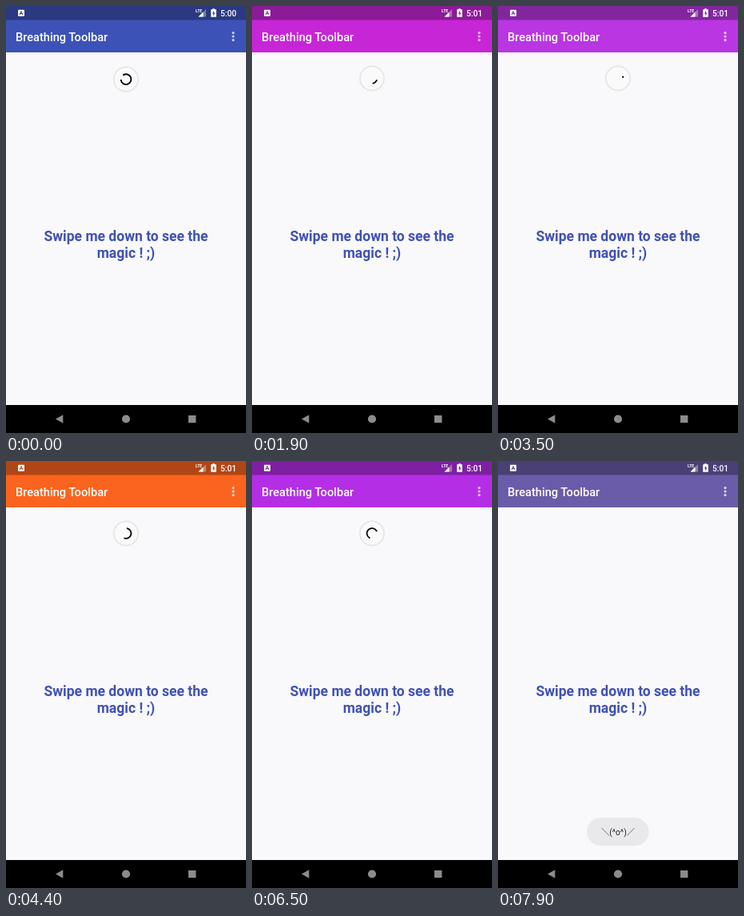
Animation of 300x534 px, one loop 8000 ms. Source, as an HTML page:

```html
<!DOCTYPE html>
<html lang="en">
<head>
<meta charset="utf-8">
<title>Breathing Toolbar</title>
<style>
html, body { margin: 0; width: 100%; height: 100%; overflow: hidden; background: #f9f8fb; }
svg { display: block; width: 300px; height: 534px; font-family: Roboto, "Noto Sans CJK JP", "Noto Sans CJK", sans-serif; }
#spinner circle { filter: drop-shadow(0 .7px 1px rgba(0, 0, 0, .3)); }
</style>
</head>
<body>
<svg viewBox="0 0 300 534">
  <rect width="300" height="534" fill="#f9f8fb"/>
  <rect id="toolbar" y="17" width="300" height="41"/>
  <rect id="status" width="300" height="17.5"/>

  <g fill="#fff">
    <rect x="15" y="4.8" width="8" height="8" rx=".8"/>
    <path id="badge" d="M17 11 19 6.6 21 11M17.8 9.6h2.4" fill="none"/>
    <text x="237" y="8.3" font-size="5" font-weight="700" textLength="">LTE</text>
    <path d="M250 4v9.5h-9.5z" opacity=".35"/>
    <path d="M246.5 7.5v6h-6z"/>
    <path d="M258.2 4.3v-1h2.6v1h2v9.4h-6.6V4.3z"/>
    <path id="bolt" d="M260 5.8 257.9 9.6h1.4v2.8l2.1-3.9h-1.4z"/>
    <text id="clock" x="268" y="13" font-size="10.2" font-weight="500">5:00</text>
    <text x="12" y="43.7" font-size="14.6" font-weight="500">Breathing Toolbar</text>
    <g opacity=".75">
      <circle cx="284" cy="33.6" r="1.6"/><circle cx="284" cy="38" r="1.6"/><circle cx="284" cy="42.6" r="1.6"/>
    </g>
  </g>

  <g fill="#3f51b5" font-size="17.5" font-weight="700" text-anchor="middle">
    <text x="150" y="294">Swipe me down to see the</text>
    <text x="150" y="314.5">magic ! ;)</text>
  </g>

  <g id="spinner">
    <circle r="14.6" fill="#fafafa"/>
    <path id="arc" fill="none" stroke="#000" stroke-width="1.83" stroke-linecap="square"/>
  </g>

  <g id="toast">
    <rect x="111" y="446" width="77.5" height="35.3" rx="17.6" fill="#e9e9eb"/>
    <text x="150" y="467.5" font-size="10.2" text-anchor="middle" fill="#222">＼(^o^)／</text>
  </g>

  <rect y="499" width="300" height="35"/>
  <g fill="#8c8c8c">
    <path d="M62 516.5 71.3 511.3v10.4z"/>
    <circle cx="150" cy="516.5" r="5.1"/>
    <rect x="228" y="512" width="9.4" height="9.2"/>
  </g>
</svg>
<script>
const LOOP = 8000, SETTLE = 200, SPIN = 866, CYCLE = 1332, HIDE = 7150, TOAST = 7400;
const colors = [
  [0, 60, 82, 183], [1000, 232, 34, 39], [1900, 199, 38, 214], [3500, 185, 54, 226],
  [4400, 251, 100, 31], [5400, 180, 46, 230], [6500, 180, 46, 230], [7900, 106, 92, 168], [8000, 100, 91, 169]
];
const el = id => document.getElementById(id);
const clamp = x => Math.max(0, Math.min(1, x));
const mix = (a, b, u) => a + (b - a) * u;

function colorAt(t) {
  const i = colors.findIndex(c => c[0] > t);
  const a = colors[i - 1], b = colors[i], u = (t - a[0]) / (b[0] - a[0]);
  return [1, 2, 3].map(k => mix(a[k], b[k], u));
}

// cubic-bezier(.4, 0, .2, 1)
function ease(x) {
  let lo = 0, hi = 1, s;
  for (let i = 0; i < 24; i++) {
    s = (lo + hi) / 2;
    if (1.2 * s * (1 - s) ** 2 + .6 * s * s * (1 - s) + s ** 3 < x) lo = s; else hi = s;
  }
  return 3 * s * s - 2 * s ** 3;
}

// Start and end of the arc, in turns
function arcAt(t) {
  if (t < SPIN) {
    const u = clamp((t - SETTLE) / (SPIN - SETTLE)), turn = mix(.67, 1, u);
    return [turn + .79 * u, turn + .8];
  }
  const total = (t - SPIN) / CYCLE, k = Math.floor(total), p = total - k;
  const base = .79 - .01 * k + .6 * total + .21 * p;
  if (p < .5) return [base, base + .79 * ease(2 * p) + .01];
  return [base + .79 * ease(2 * p - 1) - .01, base + .79];
}

function arcPath([a, b]) {
  const r = 6.4, point = v => [Math.cos(v * 2 * Math.PI) * r, Math.sin(v * 2 * Math.PI) * r].map(n => n.toFixed(3));
  return `M${point(a)}A${r} ${r} 0 ${b - a > .5 ? 1 : 0} 1 ${point(b)}`;
}

function draw(now) {
  const t = now % LOOP, rgb = colorAt(t);
  const dark = `rgb(${rgb.map(c => c * .7)})`;
  el('toolbar').setAttribute('fill', `rgb(${rgb})`);
  for (const id of ['status', 'bolt']) el(id).setAttribute('fill', dark);
  el('badge').setAttribute('stroke', dark);
  el('clock').textContent = t < 500 ? '5:00' : '5:01';

  const y = 90.5 + 1.2 * (1 - clamp(t / SETTLE)) ** 2;
  const scale = 1 - clamp((t - HIDE) / 150);
  el('spinner').setAttribute('transform', `translate(150 ${y}) scale(${scale})`);
  el('spinner').setAttribute('visibility', scale > 0 ? 'visible' : 'hidden');
  el('arc').setAttribute('d', arcPath(arcAt(t)));
  el('toast').setAttribute('opacity', clamp((t - TOAST) / 250));
}

const begin = performance.now();
function tick() {
  draw(performance.now() - begin);
  requestAnimationFrame(tick);
}
tick();
</script>
</body>
</html>
```
